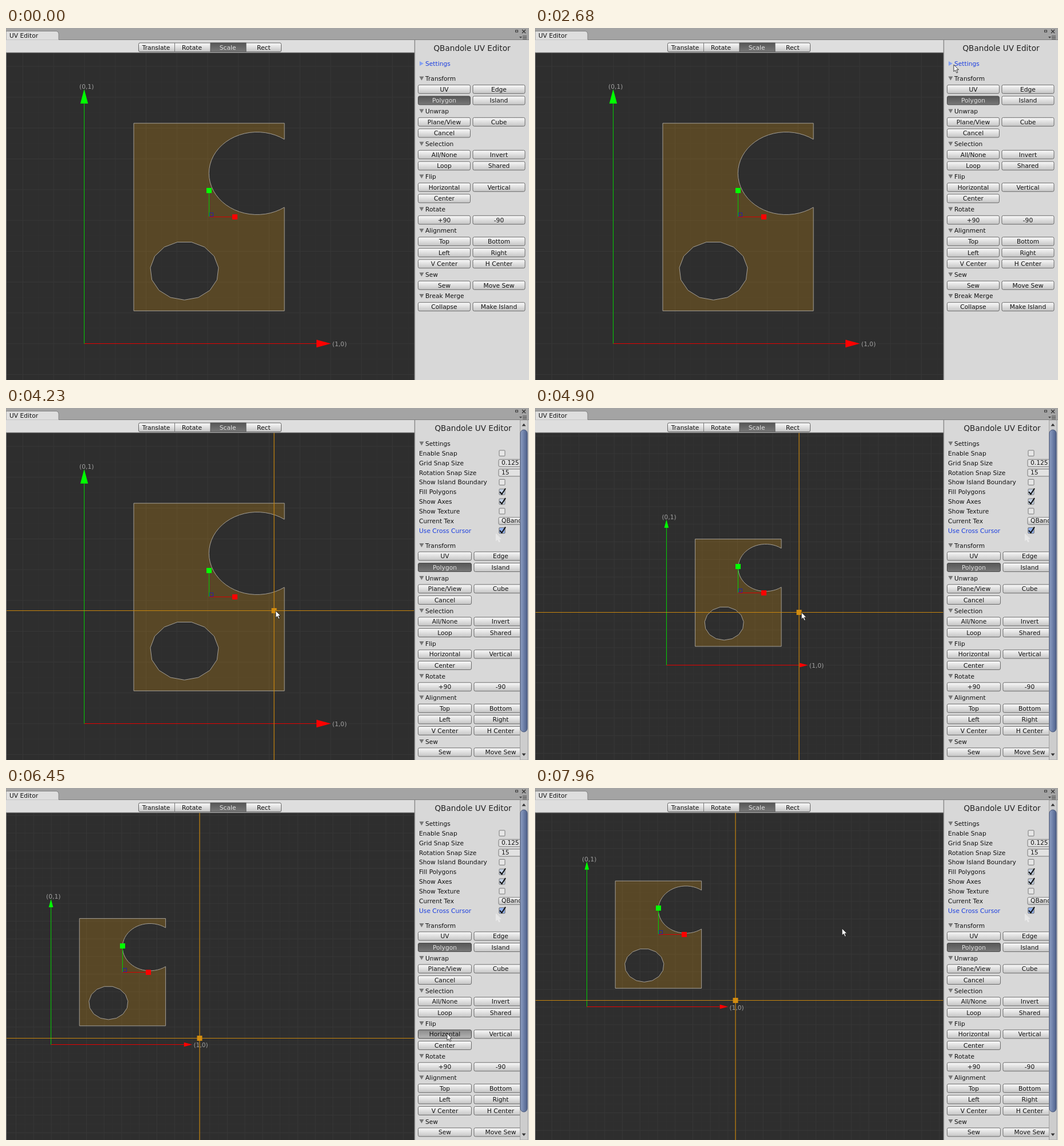
Animation, 913 px wide and 614 px high, one loop 8 s. Source, as an HTML page:

```html
<!DOCTYPE html>
<html lang="en">
<head>
<meta charset="utf-8">
<title>UV Editor</title>
<style>
html, body { margin: 0; width: 100%; height: 100%; overflow: hidden; background: #2e2e2e; }
svg { display: block; width: 913px; height: 614px; }
text { font: 10.7px "DejaVu Sans", sans-serif; fill: #111; }
.mid { text-anchor: middle; }
.pale { fill: #e0e0e0; }
.tag { fill: #a0a0a0; }
.blue { fill: #1c3fe0; }
.title { font-size: 13.6px; fill: #222; }
</style>
</head>
<body>
<svg id="stage" viewBox="0 0 913 614">
  <defs>
    <linearGradient id="up" x2="0" y2="1"><stop stop-color="#fafafa"/><stop offset="1" stop-color="#c4c4c4"/></linearGradient>
    <linearGradient id="on" x2="0" y2="1"><stop stop-color="#565656"/><stop offset="1" stop-color="#787878"/></linearGradient>
    <linearGradient id="down" x2="0" y2="1"><stop stop-color="#8c8c8c"/><stop offset="1" stop-color="#b4b4b4"/></linearGradient>
    <linearGradient id="thumb"><stop stop-color="#8fa0c2"/><stop offset=".5" stop-color="#6c7fa8"/><stop offset="1" stop-color="#4f6189"/></linearGradient>
    <clipPath id="view"><rect x="1" y="43" width="711.5" height="571"/></clipPath>
    <clipPath id="inner"><rect x="714" y="21" width="183" height="593"/></clipPath>
  </defs>
</svg>
<script>
const LOOP = 8000;
const stage = document.getElementById('stage');

function set(el, attrs) {
  for (const name in attrs) el.setAttribute(name, attrs[name]);
}
function add(parent, tag, attrs = {}, text) {
  const el = document.createElementNS('http://www.w3.org/2000/svg', tag);
  set(el, attrs);
  if (text !== undefined) el.textContent = text;
  parent.appendChild(el);
  return el;
}
const rect = (p, x, y, width, height, fill, more) => add(p, 'rect', { x, y, width, height, fill, ...more });
const path = (p, d, fill, more) => add(p, 'path', { d, fill, ...more });
const line = (p, d, stroke, width = 1) => path(p, d, 'none', { stroke, 'stroke-width': width });
const label = (p, x, y, text, style = '') => add(p, 'text', { x, y: y + 4, class: style }, text);
const show = (el, on) => el.setAttribute('display', on ? 'inline' : 'none');
const place = (el, x, y) => el.setAttribute('transform', `translate(${x} ${y})`);

// Canvas: grid, polygon, axes, gizmo, cross
rect(stage, 0, 0, 913, 614, '#2e2e2e');
const view = add(stage, 'g', { 'clip-path': 'url(#view)' });
const minor = line(view, '', '#313131');
const major = line(view, '', '#373737');
const face = path(view, '', 'rgba(255,170,5,.2)', { 'fill-rule': 'evenodd', stroke: '#a5a098' });

function makeAxis(color, lineColor, text, style) {
  return { line: line(view, '', lineColor), head: path(view, '', color), tag: label(view, 0, 0, text, style) };
}
const axisX = makeAxis('#f00', '#e60000', '(1,0)', 'tag');
const axisY = makeAxis('#0f0', '#00cc00', '(0,1)', 'tag mid');

const gizmo = add(view, 'g');
line(gizmo, 'M0 0V-42', '#00d000');
line(gizmo, 'M0 0H41', '#d80000');
rect(gizmo, 1, -7, 6, 6, 'none', { stroke: '#2222a8' });
rect(gizmo, -4.5, -50.5, 9, 9, '#0f0');
rect(gizmo, 40.5, -4.5, 9, 9, '#f00');

const cross = add(view, 'g');
line(cross, 'M-913 0H913M0-614V614', '#c8860e', 1.2);
rect(cross, -4.5, -4.5, 9, 9, '#d28c10');

// Window frame and toolbar
rect(stage, 0, 0, 913, 21, '#a4a4a4');
path(stage, 'M0 21V5.5H88Q92 6 92 10V21Z', '#dedede', { stroke: '#858585' });
rect(stage, 0, 20.5, 913, 22.5, '#dedede');
line(stage, 'M92 20.5H913M0 43H713M.5 43V614', '#808080');
label(stage, 6, 13, 'UV Editor');
rect(stage, 889.5, 4, 4, 3, 'none', { stroke: '#333' });
line(stage, 'M901 3L907 9M907 3L901 9', '#333', 1.3);
line(stage, 'M902 14H909M902 16.5H909M902 19H909', '#444');
path(stage, 'M896 15H901L898.5 18Z', '#444');
rect(stage, 231.5, 26, 249, 15.5, 'url(#up)', { rx: 2.5, stroke: '#666' });
rect(stage, 357, 26, 62, 15.5, 'url(#on)', { stroke: '#555' });
line(stage, 'M294.5 26V41.5', '#777');
['Translate', 'Rotate', 'Scale', 'Rect'].forEach((name, i) =>
  label(stage, 262 + i * 62.6, 33.5, name, name === 'Scale' ? 'mid pale' : 'mid'));

// Side panel, built once collapsed and once with its settings open
const SECTIONS = {
  'Transform': ['UV', 'Edge', 'Polygon', 'Island'],
  'Unwrap': ['Plane/View', 'Cube', 'Cancel'],
  'Selection': ['All/None', 'Invert', 'Loop', 'Shared'],
  'Flip': ['Horizontal', 'Vertical', 'Center'],
  'Rotate': ['+90', '-90'],
  'Alignment': ['Top', 'Bottom', 'Left', 'Right', 'V Center', 'H Center'],
  'Sew': ['Sew', 'Move Sew'],
  'Break Merge': ['Collapse', 'Make Island']
};
const OPTIONS = {
  'Enable Snap': false, 'Grid Snap Size': '0.125', 'Rotation Snap Size': '15',
  'Show Island Boundary': false, 'Fill Polygons': true, 'Show Axes': true,
  'Show Texture': false, 'Current Tex': 'QBandole', 'Use Cross Cursor': false
};

function button(p, x, y, w, name) {
  const on = name === 'Polygon';
  const box = rect(p, x, y - 7.5, w, 15, on ? 'url(#on)' : 'url(#up)', { rx: 2.5, stroke: on ? '#4a4a4a' : '#6c6c6c' });
  label(p, x + w / 2, y, name, on ? 'mid pale' : 'mid');
  return box;
}
function fold(p, y, title) {
  path(p, `M721.5 ${y - 3.5}h8l-4 7Z`, '#777');
  return label(p, 732, y, title);
}
function checkbox(p, y, on, fill = on ? '#c4d2e6' : '#e6e6e6') {
  const g = add(p, 'g');
  rect(g, 861, y - 5, 10, 10, fill, { rx: 1, stroke: '#777' });
  if (on) line(g, `M862 ${y}l3.5 4l6.5-10`, '#111', 2);
  return g;
}
function field(p, y, text, fill) {
  rect(p, 860, y - 6, 60, 12.5, fill, { rx: 2, stroke: '#777' });
  label(p, 865, y - .5, text);
}

function buildPanel(open) {
  const root = add(stage, 'g');
  rect(root, 713, 21, 200, 593, '#d8d8d8');
  line(root, 'M713.5 21V614', '#8a8a8a', 1.5);
  const g = add(root, 'g', open ? { 'clip-path': 'url(#inner)' } : {});
  const out = { root, buttons: {} };
  label(g, open ? 815.5 : 813.5, 35.5, 'QBandole UV Editor', 'mid title');
  if (open) {
    out.settings = fold(g, 62, 'Settings');
    let y = 62;
    for (const name in OPTIONS) {
      const value = OPTIONS[name];
      y += 16.85;
      out.last = label(g, 721, y, name);
      if (typeof value === 'string') field(g, y, value, name === 'Current Tex' ? 'url(#up)' : '#e2e2e2');
      else checkbox(g, y, value);
    }
    out.check = checkbox(g, y, true, '#8fb0f0');
    rect(root, 897.5, 21, 13.5, 593, '#cdcdcd', { stroke: '#a0a0a0' });
    path(root, 'M900.5 31.5h7l-3.5-4.5ZM900.5 602.5h7l-3.5 4.5Z', '#333');
    rect(root, 898, 38, 12, 527, 'url(#thumb)', { rx: 6, stroke: '#45557a' });
  } else {
    label(g, 732, 62, 'Settings', 'blue');
    path(g, 'M722 58v8l7-4Z', '#86a2f2');
  }
  const w = open ? 93 : 91;
  let y = open ? 239.6 : 88;
  for (const title in SECTIONS) {
    const names = SECTIONS[title];
    fold(g, y, title);
    y += 18.8;
    names.forEach((name, i) => {
      out.buttons[name] = button(g, 719.5 + i % 2 * (w + 4.5), y + (i >> 1) * 19.6, w, name);
    });
    y += Math.ceil(names.length / 2) * 19.6 - 1;
  }
  return out;
}
const closed = buildPanel(false), opened = buildPanel(true);

const ARROW = 'M0 0V12L2.8 9.5L5 14.3L7 13.4L4.9 8.8H8.6Z';
const ghost = path(stage, ARROW, '#eee', { stroke: '#fafafa', 'stroke-dasharray': '1 1', opacity: .7 });
place(ghost, 855.5, 219.5);
const pointer = path(stage, ARROW, '#fff', { stroke: '#222', 'stroke-width': .9 });

// Pointer moves: from time, to time, x, y; it rests in between
const MOVES = [
  [40, 280, 757, 271], [820, 1010, 830, 276], [1340, 1410, 765, 291],
  [2040, 2420, 742, 22], [2420, 2680, 731, 64], [2960, 3600, 858, 214],
  [3670, 3800, 544, 389], [3860, 3900, 478, 351], [3950, 4460, 465, 356],
  [4900, 5100, 493, 437], [5120, 5280, 556, 345], [5280, 5600, 405, 344],
  [5820, 5900, 789, 351], [6080, 6380, 770, 428], [6990, 7140, 834, 428],
  [7140, 7630, 484, 303], [7700, 7800, 496, 237], [7920, 7960, 536, 245]
];
// Clicks: press, release, flip button
const CLICKS = [
  [440, 520, 'Horizontal'], [720, 800, 'Horizontal'], [1070, 1150, 'Vertical'], [1290, 1330, 'Vertical'],
  [1620, 1660, 'Center'], [1960, 2000, 'Center'], [6430, 6570, 'Horizontal'], [6870, 6950, 'Horizontal']
];

const ramp = (t, from, to) => Math.min(1, Math.max(0, (t - from) / (to - from)));

function pointerAt(t) {
  let x = 868, y = 30;
  for (const [from, to, nx, ny] of MOVES) {
    const k = ramp(t, from, to);
    x += (nx - x) * k;
    y += (ny - y) * k;
  }
  return [x, y];
}

// Polygon with a bite in the right edge, and a 15-sided hole
const LEFT = 223, RIGHT = 486, TOP = 166, BOTTOM = 493.3;
const arc = (n, from, to, cx, cy, rx, ry) => Array.from({ length: n }, (_, i) => {
  const a = from + (to - from) * i / (n - 1);
  return [cx + rx * Math.cos(a), cy + ry * Math.sin(a)];
});
const bite = Math.acos((RIGHT - 438.3) / 84);
const outer = [[LEFT, TOP], [RIGHT, TOP], ...arc(41, -bite, bite - 2 * Math.PI, 438.3, 253.4, 84, 72), [RIGHT, BOTTOM], [LEFT, BOTTOM]];
const hole = arc(16, Math.PI / 2, Math.PI * 2.5, 311.5, 423.3, 59.8, 51).slice(1);

function grid(step, ox, oy) {
  let d = '';
  for (let x = ox % step; x < 713; x += step) d += `M${x.toFixed(1)} 43V614`;
  for (let y = oy % step; y < 614; y += step) d += `M0 ${y.toFixed(1)}H713`;
  return d;
}

function drawAxes(ox, oy, s) {
  const x = Math.round(ox) - .5, y = Math.floor(oy - .6) + .5;
  const tipX = ox + 430 * s, tipY = oy - 444 * s, len = 25 * s, half = 6.7 * s;
  set(axisX.line, { d: `M${x} ${y}H${tipX - len}` });
  set(axisY.line, { d: `M${x} ${y}V${tipY + len}` });
  set(axisX.head, { d: `M${tipX} ${y}l${-len} ${-half}v${2 * half}Z` });
  set(axisY.head, { d: `M${x} ${tipY}l${-half} ${len}h${2 * half}Z` });
  set(axisX.tag, { x: tipX + 2.5, y: oy + 4.5 });
  set(axisY.tag, { x: ox + 3.7, y: tipY - .5 });
}

function draw(t) {
  // Zoom out in four wheel notches, then two drags of the view
  const zoom = Math.ceil(ramp(t, 4460, 4610) * 4) / 4;
  const pan = ramp(t, 5280, 5600), drag = ramp(t, 7700, 7800);
  const dx = 12 * drag - 151.4 * pan, dy = -65.5 * drag - 1 * pan;
  const s = 1 - .428 * zoom;
  const ox = 137 + 93.4 * zoom + dx, oy = 550.7 - 102.1 * zoom + dy;
  const px = x => ox + s * (x - 137), py = y => oy + s * (y - 550.6);

  let flipX = false, flipY = false, held = '';
  for (const [press, release, name] of CLICKS) {
    if (t >= release) {
      flipX ^= name !== 'Vertical';
      flipY ^= name !== 'Horizontal';
    } else if (t >= press) held = name;
  }
  const trace = pts => 'M' + pts.map(([x, y]) =>
    px(flipX ? LEFT + RIGHT - x : x).toFixed(2) + ' ' + py(flipY ? TOP + BOTTOM - y : y).toFixed(2)).join('L') + 'Z';

  set(minor, { d: grid(26.87 * s, ox, oy) });
  set(major, { d: grid(53.74 * s, ox, oy) });
  set(face, { d: trace(outer) + trace(hole) });
  drawAxes(ox, oy, s);
  place(gizmo, Math.floor(px(354.6)) + .5, Math.floor(py(329.5)) + .5);

  // The cross trails the pointer, then stays fixed to the view
  const [cx, cy] = pointerAt(Math.min(t - 50, 5110));
  show(cross, t >= 3670);
  place(cross, Math.round(cx - 4 + dx), Math.floor(cy + dy) + .5);

  const open = t >= 2850, checked = t >= 3580;
  show(closed.root, !open);
  show(opened.root, open);
  show(opened.check, checked);
  set(opened.settings, { class: checked ? '' : 'blue' });
  set(opened.last, { class: checked ? 'blue' : '' });
  for (const panel of [closed, opened])
    for (const name of SECTIONS.Flip)
      set(panel.buttons[name], { fill: name === held ? 'url(#down)' : 'url(#up)', stroke: name === held ? '#444' : '#6c6c6c' });

  show(ghost, t >= 3670);
  show(pointer, t >= 40);
  place(pointer, ...pointerAt(t));
}

const start = performance.now();
function frame() {
  draw((performance.now() - start) % LOOP);
  requestAnimationFrame(frame);
}
draw(0);
requestAnimationFrame(frame);
</script>
</body>
</html>
```
